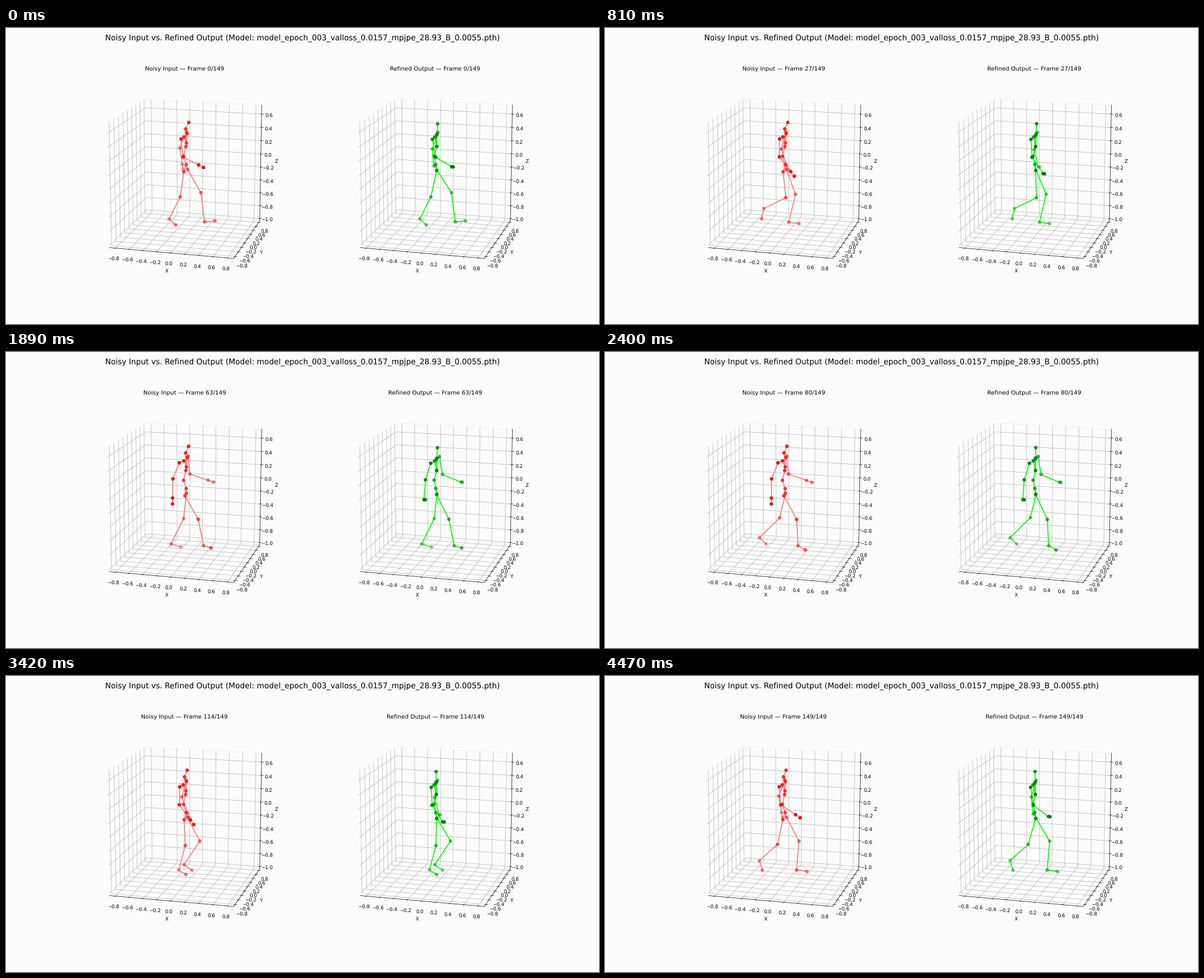
Write a matplotlib script that moves like this. It is 1058 by 529 pixels and loops after 4.5 s.

```python
import numpy as np
import matplotlib.pyplot as plt
from matplotlib.animation import FuncAnimation
from matplotlib.collections import LineCollection
from matplotlib.colors import to_rgb

WIDTH, HEIGHT = 1058, 529
FRAMES, INTERVAL = 150, 30
PERIOD = 134                      # frames per full stride
PANEL_X = (318.6, 765.8)          # panel centres
PELVIS = np.array([321.5, 244])   # body origin on the stage, left panel
BACKGROUND = "#fcfcfc"
SIDES = {"L": 1, "R": -1}

plt.rcParams.update({
    "font.family": "DejaVu Sans",
    "text.hinting": "none",
    "figure.facecolor": BACKGROUND,
    "axes.facecolor": BACKGROUND,
    "savefig.facecolor": BACKGROUND,
})

# Leg angles in degrees from straight down, positive forward
KEY_TIMES = [0, 15, 27, 45, 65, 82, 94, 112]
THIGH = [-8, -12, 6, 28, 31, 29, 21, 4]
SHANK = [-27, -45, -58, -35, 10, -2, -11, -16]
FOOT = [64, 30, -4, 40, 92, 77, 78, 75]

# Trunk joints as (forward, down) from the pelvis
NOISY_TRUNK = {"pelvis": (0, 0), "spine1": (-4.8, -14.2),
               "spine2": (-0.6, -32), "spine3": (0.4, -38.5),
               "neck": (-0.9, -63.5), "head": (4.6, -75.8)}
REFINED_TRUNK = {"pelvis": (-1.9, 0), "spine1": (-4.8, -14.5),
                 "spine2": (-0.3, -32), "spine3": (-0.3, -32.4),
                 "neck": (0.4, -54.4), "head": (1.4, -73)}

CHAINS = ["pelvis spine1 spine2 spine3 neck head"]
for s in SIDES:
    CHAINS += [f"pelvis {s}_hip {s}_knee {s}_ankle {s}_foot",
               f"spine3 {s}_collar {s}_shoulder {s}_elbow {s}_wrist {s}_hand"]
BONES = [pair for chain in CHAINS
         for pair in zip(chain.split(), chain.split()[1:])]
JOINTS = list(dict.fromkeys(name for bone in BONES for name in bone))


def stride_angle(keys, phase):
    """Smooth periodic curve through the key angles."""
    t = np.array(KEY_TIMES, float)
    t = np.concatenate([t - PERIOD, t, t + PERIOD])
    p = np.tile(np.array(keys, float), 3)
    slope = np.gradient(p, t)
    i = np.searchsorted(t, phase, side="right") - 1
    h = t[i + 1] - t[i]
    s = (phase - t[i]) / h
    return ((1 + 2 * s) * (1 - s) ** 2 * p[i] + s * (1 - s) ** 2 * h * slope[i]
            + s * s * (3 - 2 * s) * p[i + 1] - s * s * (1 - s) * h * slope[i + 1])


def limb(length, degrees, outward=0):
    """Segment vector as (forward, down, sideways)."""
    a = np.radians(degrees)
    return np.array([length * np.sin(a), length * np.cos(a), outward])


def pose(frame, refined):
    """Joint positions as (forward, down, sideways), left side positive."""
    lean = -3 / (1 + np.exp((78 - frame) / 8))

    def upper(forward, down, sideways=0):
        return np.array([forward + lean * (down / 76) ** 2, down, sideways])

    trunk = REFINED_TRUNK if refined else NOISY_TRUNK
    body = {name: upper(*spot) for name, spot in trunk.items()}
    for s, sign in SIDES.items():
        phase = (frame + (PERIOD / 2 if s == "L" else 0)) % PERIOD
        u = 2 * np.pi * (phase - 4) / PERIOD
        swing = np.cos(u)

        hip = np.array([-0.9 - sign * -1 * -swing * sign, 10.8, 9 * sign])
        knee = hip + limb(46, stride_angle(THIGH, phase))
        ankle = knee + limb(49.5, stride_angle(SHANK, phase), -10 * sign)
        foot = ankle + limb(16, stride_angle(FOOT, phase), 10 * sign)

        upper_arm = -7.5 + 14.5 * swing
        forearm = 33 + 36 * swing + 6 * np.cos(2 * u)
        if refined:
            hip = np.array([-0.1, 10.5, 1.5 * sign])
            collar = upper(-2, -50.8, 6.5 * sign)
            shoulder = upper(-3 + 1.5 * swing, -50.9, 24.5 * sign)
            elbow = shoulder + limb(32, upper_arm + 4)
            wrist = elbow + limb(33, forearm - 4, 10 * sign)
            hand = wrist + (2.5, 0, 0)
        else:
            collar = upper(-1, -52.2, 11.5 * sign)
            shoulder = upper(-4.4 + 1.5 * swing, -51.5, 24.5 * sign)
            elbow = shoulder + limb(32, upper_arm)
            wrist = elbow + limb(31.5, forearm, 10 * sign)
            hand = wrist + 0.31 * (wrist - elbow)

        parts = dict(hip=hip, knee=knee, ankle=ankle, foot=foot, collar=collar,
                     shoulder=shoulder, elbow=elbow, wrist=wrist, hand=hand)
        body.update({f"{s}_{part}": spot for part, spot in parts.items()})
    return np.array([body[name] for name in JOINTS])


def project(points):
    """Stage position and view depth of body points."""
    forward, down, sideways = points.T
    spots = np.column_stack([forward + 0.26 * sideways,
                             down + 0.1 * forward - 0.25 * sideways])
    return PELVIS + spots, 0.93 * sideways - 0.25 * forward + 0.26 * down


def add_box(position):
    ax = fig.add_subplot(1, 2, position, projection="3d")
    ax.set_box_aspect((1, 1, 1))
    ax.view_init(elev=15, azim=-75)
    ticks = np.linspace(-0.8, 0.8, 9)
    ax.set(xticks=ticks, yticks=ticks, zticks=ticks - 0.2,
           xlabel="X", ylabel="Y", zlabel="Z")
    half = 0.85 * 25 / 24
    ax.set(xlim=(-half, half), ylim=(-half, half),
           zlim=(-0.15 - half, -0.15 + half))
    for axis in (ax.xaxis, ax.yaxis, ax.zaxis):
        axis.pane.set_fill(False)
    return ax


class Walker:
    def __init__(self, panel, label, line_color, dot_color):
        self.refined = panel == 1
        self.label = label
        self.shift = np.array([PANEL_X[panel] - PANEL_X[0], 0])
        self.rgb = to_rgb(dot_color)
        self.title = stage.text(PANEL_X[panel], 75.6, "", fontsize=12,
                                ha="center", va="baseline")
        self.bones = LineCollection([], colors=line_color, linewidths=2,
                                    capstyle="projecting", zorder=2)
        stage.add_collection(self.bones, autolim=False)
        self.dots = stage.scatter([], [], s=40, zorder=3)

    def update(self, frame):
        spots, depth = project(pose(frame, self.refined))
        spots = spots + self.shift
        place = dict(zip(JOINTS, spots))
        alpha = 1 - 0.7 * (depth - depth.min()) / np.ptp(depth)
        order = np.argsort(-depth)
        self.bones.set_segments([(place[a], place[b]) for a, b in BONES])
        self.dots.set_offsets(spots[order])
        self.dots.set_color([(*self.rgb, a) for a in alpha[order]])
        self.title.set_text(f"{self.label} — Frame {frame}/{FRAMES - 1}")
        return self.bones, self.dots, self.title


fig = plt.figure(figsize=(17, 8.5), dpi=62.2354)
fig.suptitle("Noisy Input vs. Refined Output (Model: model_epoch_003_valloss_"
             "0.0157_mpjpe_28.93_B_0.0055.pth)", fontsize=16)
boxes = [add_box(1), add_box(2)]

# The boxes never change, so they are rendered once and reused as a backdrop
fig.canvas.draw()
backdrop = np.array(fig.canvas.buffer_rgba())
for box in boxes:
    box.remove()
fig.suptitle("")
fig.figimage(backdrop, origin="upper", zorder=-1)

stage = fig.add_axes([0, 0, 1, 1])
stage.set(xlim=(0, WIDTH), ylim=(HEIGHT, 0))
stage.axis("off")

walkers = [Walker(0, "Noisy Input", "lightcoral", "red"),
           Walker(1, "Refined Output", "lime", "green")]


def draw(frame):
    return [artist for walker in walkers for artist in walker.update(frame)]


animation = FuncAnimation(fig, draw, frames=FRAMES, interval=INTERVAL,
                          repeat=True, repeat_delay=0, blit=False)
plt.show()
```
